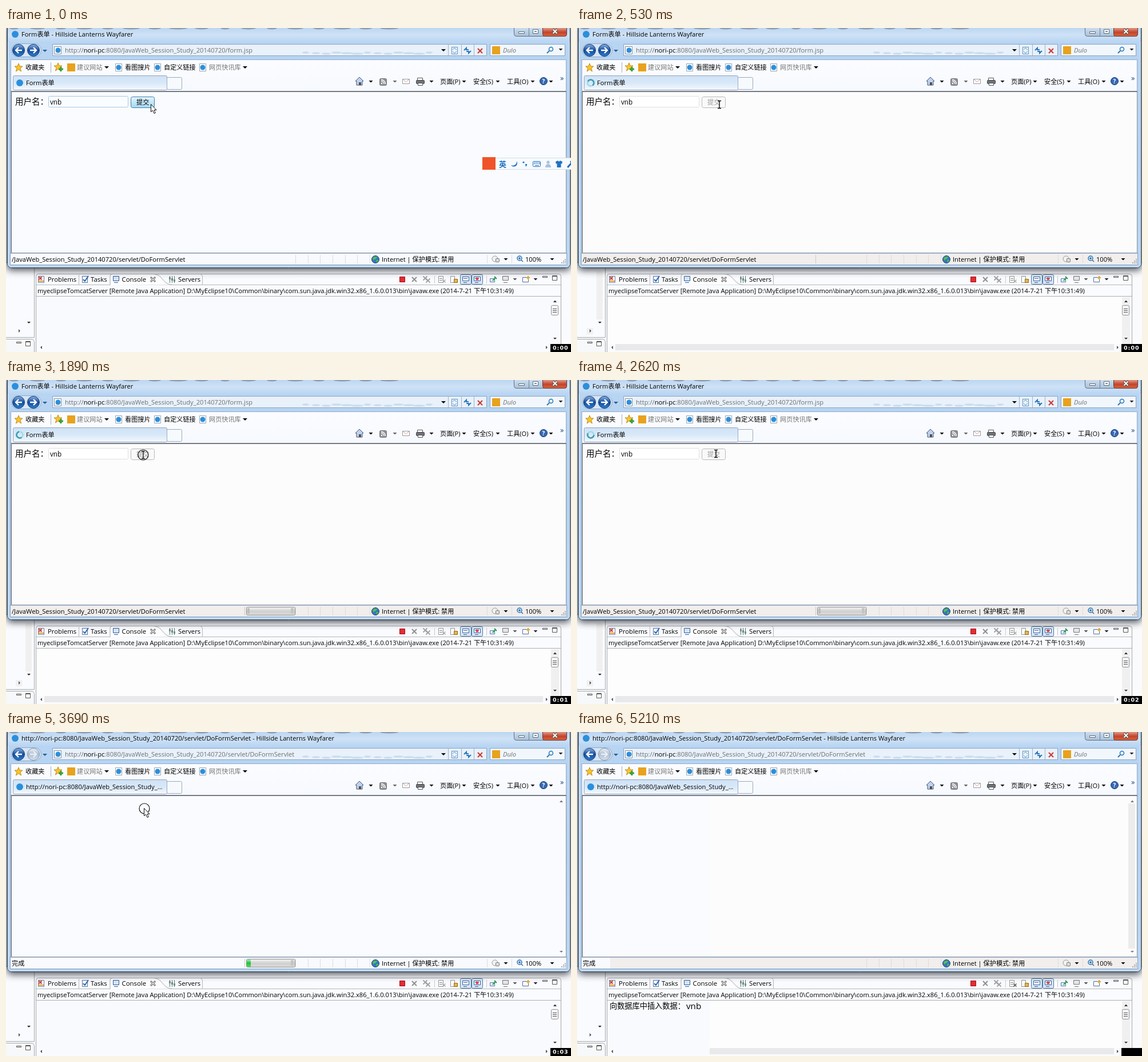
Animation, 988 px wide and 567 px high, one loop 5470 ms. Source, as an HTML page with a canvas:

```html
<!DOCTYPE html>
<html lang="zh-CN">
<head>
<meta charset="utf-8">
<style>
html, body { margin: 0; width: 100%; height: 100%; overflow: hidden; background: #fff; }
canvas { display: block; }
</style>
</head>
<body>
<canvas width="988" height="567"></canvas>
<script>
const g = document.querySelector('canvas').getContext('2d');
const LOOP = 5470, PAGE = 3690;
const FONT = '"Open Sans", "Noto Sans CJK SC", "Noto Sans CJK", sans-serif';
const BROWSER = ' - Hillside Lanterns Wayfarer';
const USER = 'vnb', HOST = 'nori-pc', ROOT = ':8080/JavaWeb_Session_Study_20140720/';
const STEPS = [0, 140, 260, 380, 530, 650, 760, 870, 990, 1140, 1260, 1380, 1530, 1650, 1760, 1880, 1990,
  2110, 2230, 2380, 2500, 2620, 2770, 2890, 3040, 3150, 3260, 3410, 3540, 3690, 3810, 3960, 4070, 4180,
  4330, 4450, 4570, 4690, 4810, 4960, 5110, 5210];
const CLICKS = [140, 760, 1140, 1530, 1880, 2230, 2500, 2890, 3260, 3690];
const PATH = [[0, 253, 133], [260, 253, 133], [530, 249, 134], [1140, 237, 131], [1990, 240, 131],
  [2620, 243, 129], [3540, 241, 132], [3690, 241, 133], [4180, 241, 133], [4810, 938, 558]];

function paint(fill, stroke, width = 1) {
  if (fill) { g.fillStyle = fill; g.fill(); }
  if (stroke) { g.strokeStyle = stroke; g.lineWidth = width; g.stroke(); }
}
function box(x, y, w, h, fill, stroke, r = 0) {
  const o = stroke ? .5 : 0;
  g.beginPath();
  g.roundRect(x + o, y + o, w - 2 * o, h - 2 * o, r);
  paint(fill, stroke);
}
function dot(x, y, r, fill, stroke, width) {
  g.beginPath();
  g.arc(x, y, r, 0, 7);
  paint(fill, stroke, width);
}
function shape(d, x, y, fill, stroke, width) {
  g.save();
  g.translate(x, y);
  const p = new Path2D(d);
  if (fill) { g.fillStyle = fill; g.fill(p); }
  if (stroke) { g.strokeStyle = stroke; g.lineWidth = width || 1; g.stroke(p); }
  g.restore();
}
function grad(y0, y1, ...colors) {
  const f = g.createLinearGradient(0, y0, 0, y1);
  colors.forEach((c, i) => f.addColorStop(i / (colors.length - 1), c));
  return f;
}
// Draws text centred on y and returns its right end.
function text(s, x, y, color = '#000', size = 11.15, style = '') {
  g.font = `${style} ${size}px ${FONT}`;
  g.fillStyle = color;
  g.fillText(s, x, Math.round(y + size * .36));
  return x + g.measureText(s).width;
}
const vline = (x, y0, y1, c) => box(x, y0, 1, y1 - y0, c);
const hline = (x0, x1, y, c) => box(x0, y, x1 - x0, 1, c);
const down = (x, y, c = '#000', s = 4) => shape(`M${-s} -2H${s}L0 ${s - 2}Z`, x, y, c);
const up = (x, y, c = '#333') => shape('M-3 2H3L0 -1.5Z', x, y, c);
const side = (x, y, d) => shape(`M${-d} -3V3L${2 * d} 0Z`, x, y, '#555');
const badge = (x, y, r = 6) => dot(x, y, r, '#2b8fdc');
const star = (x, y) => shape('M0 -7L2 -2 7 -2 3 1.5 4.5 7 0 3.5 -4.5 7 -3 1.5 -7 -2 -2 -2Z', x, y, '#f9c52b', '#c98a12');
const cross = (x, y, c, s = 4, w = 2) => shape(`M${-s} ${-s}L${s} ${s}M${s} ${-s}L${-s} ${s}`, x, y, null, c, w);

// Surface that turns from a cool to a warm white right of `from`.
function surface(x, y, w, h, from, cool, warm) {
  box(x, y, w, h, cool);
  const x0 = Math.max(x, from);
  if (x0 < x + w) box(x0, y, x + w - x0, h, warm);
}

function frameWindow() {
  g.save();
  g.shadowColor = 'rgba(30,35,45,.8)';
  g.shadowBlur = 13;
  g.shadowOffsetY = 4;
  box(2, -10, 985, 430, '#b3d2f3', null, 7);
  g.restore();
  box(2, -10, 985, 430, grad(0, 420, '#b9d5f3', '#b0d0f2', '#b7d5f4'), '#1c2a3a', 7);
  box(3, -10, 983, 429, null, '#e4f0fb', 6);
  box(3, 0, 983, 24, grad(0, 24, '#bcd6f2', '#cfe2f6', '#bad6f3'));
  for (let i = 0; i < 17; i++) {
    g.beginPath();
    g.ellipse(14 + i * 41, 0, 8 + i * 5 % 9, 2.5, 0, 0, 7);
    paint('#8f9dac');
  }
  // window buttons
  box(888, -5, 93, 20, grad(0, 15, '#cbdcec', '#a9c1d9'), '#5d7085', 4);
  box(938, -5, 43, 20, grad(0, 15, '#dc9a8b', '#c5432b', '#d9663f'), '#6b3a36', 4);
  vline(914, 0, 14, '#6f8297');
  box(896, 6, 11, 4, '#fff', '#5b6b7d');
  box(921, 2, 10, 8, '#fff', '#5b6b7d');
  box(924, 5, 4, 2, '#7a90a8');
  cross(960, 6, '#555', 4, 4);
  cross(960, 6, '#fff', 3.5, 2);
}

function navigation(loaded) {
  const tail = loaded ? 'servlet/DoFormServlet' : 'form.jsp';
  const title = loaded ? 'http://' + HOST + ROOT + tail : 'Form表单';
  badge(16, 11);
  text(title + BROWSER, 27, 10.5);

  box(9, 27, 53, 24, '#d7e5f4', '#8ea7c2', 12);
  for (const [x, on] of [[22, true], [48, !loaded]]) {
    dot(x, 39, 10.5, on ? grad(28, 50, '#8db8ea', '#164b9b', '#2b83d6') : grad(28, 50, '#eef3f8', '#aebfd2', '#d9e4ee'), on ? '#173c72' : '#8397ad');
    shape(x < 30 ? 'M6 0H-5M0 -5L-5 0 0 5' : 'M-6 0H5M0 -5L5 0 0 5', x, 39, null, on ? '#fff' : '#e8eff6', 2.4);
  }
  down(68, 40, '#2b5f94');

  box(81, 28, 760, 21, '#e9f1fa', '#8aa3bf');
  for (let i = 0; i < 13; i++) {
    g.beginPath();
    g.ellipse(524 + i * 18, 43 + i % 3, 6 + i * 7 % 6, 1.7, 0, 0, 7);
    paint('#cbdcef');
  }
  box(84, 32, 13, 14, '#fff', '#8792a0');
  badge(91, 39, 4.5);
  let x = text('http://', 103, 39, '#6d6f72');
  x = text(HOST, x, 39);
  text(ROOT + tail, x, 39, '#6d6f72');
  down(765, 39);
  [773, 796, 818].forEach(v => vline(v, 29, 48, '#9fb3c9'));
  box(779, 33, 11, 13, '#eaf5ff', '#5b93c4');
  shape('M2 5L5 2 9 5M2 8L5 11 9 8', 779, 33, null, '#4f92c8');
  shape('M-6 0L-2 -4V-1H2M6 1L2 5V2H-2', 807, 39, null, '#2878bb', 2);
  cross(829, 40, '#d0342c');

  box(846, 28, 132, 21, '#f2f7fc', '#8aa3bf');
  box(850, 32, 14, 14, '#e8a21c');
  text('Dulo', 869, 39, '#6d6f72', 11.15, 'italic');
  dot(953, 37, 3.5, '#e9f5ff', '#2c75b8', 1.5);
  shape('M-2 2L-6 6', 952, 38, null, '#2c75b8', 2);
  down(970, 38, '#222', 3.5);
}

function toolbars(loaded, t, spin) {
  box(8, 55, 972, 57, grad(55, 111, '#fafcff', '#f9fbfe', '#f6f9fe'), '#94aac3');
  star(22, 69);
  text('收藏夹', 34, 69);
  vline(78, 60, 78, '#a5b1bf');
  star(91, 68);
  shape('M0 4H8M4 0V8', 92, 68, null, '#35a03a', 3);
  box(107, 62, 14, 14, '#e8a21c');
  text('建议网站', 124, 69, '#777');
  down(176, 69);
  [[197, '看图搜片', '#000'], [265, '自定义链接', '#000'], [344, '网页快讯库', '#777']].forEach(([x, s, c]) => {
    box(x - 6, 62, 12, 14, '#fff', '#9aa3ad');
    badge(x, 69, 4.5);
    text(s, x + 11, 69, c);
  });
  down(418, 69);

  box(12, 83, 270, 26, grad(84, 108, '#cfe2f5', '#d8e8f8', '#f4f8fd'), '#8ea4bd', 2);
  box(281, 86, 27, 22, '#f7fafd', '#9aabbe', 2);
  if (t >= 530 && !loaded) {
    dot(24, 96, 5.5, null, '#9edbe5', 2.6);
    g.beginPath();
    g.arc(24, 96, 5.5, spin, spin + 3.6);
    paint(null, '#3f9db4', 2.6);
  } else badge(24, 96);
  text(loaded ? 'http://' + HOST + ':8080/JavaWeb_Session_Study_...' : 'Form表单', 35, 96);

  shape('M-7 0L0 -7 7 0H5V7H-5V0Z', 618, 93, '#bfd2ec', '#3e5884');
  box(617, 95, 4, 5, '#5e4c48');
  box(653, 88, 13, 13, '#8d8f92', '#77797c', 2);
  shape('M3 5A5 5 0 0 1 8 10M3 2.5A7.5 7.5 0 0 1 10.5 10', 653, 88, null, '#fff', 1.3);
  dot(657, 97, 1.3, '#fff');
  box(693, 89, 13, 9, '#fff', '#9a9a9a');
  shape('M1 1L6.5 5 12 1', 693, 89, null, '#d49b9b');
  box(719, 87, 10, 5, '#fff', '#555');
  box(717, 91, 15, 7, '#6e7277', '#444', 1);
  box(720, 96, 9, 5, '#fff', '#555');
  [638, 680, 744, 801, 860, 921, 953].forEach(x => down(x, 94, x === 680 ? '#666' : '#000', 3.5));
  text('页面(P)', 759, 94);
  text('安全(S)', 817, 94);
  text('工具(O)', 876, 94);
  dot(940, 93, 6.5, '#3568b3', '#1f3f78');
  text('?', 937.5, 93, '#fff', 10, 'bold');
  text('»', 969, 87, '#1f3f78', 13);
}

function page(loaded, t, warm) {
  box(8, 110, 972, 284, '#fff', '#8a9099');
  surface(10, 112, 969, 281, warm, '#f9fbfe', '#fcfcfc');
  hline(9, 980, 111, '#63676d');
  vline(9, 111, 393, '#7d828a');
  if (loaded) {
    if (warm < 988) box(964, 125, 12, 254, '#ececec');
    up(971, 121, '#777');
    down(971, 385, '#777', 3);
    return;
  }
  text('用户名：', 16, 129, '#000', 14.5);
  const off = t >= 380;
  box(74, 119, 140, 20, off ? '#fff' : '#fafdff', off ? '#dcdfe2' : '#a5c7e3', 2);
  text(USER, 77, 129.5, '#000', 11.7);
  const fill = off ? '#f9f9f9' : t >= 140 ? grad(120, 140, '#c5e3f4', '#7fbedf') : grad(120, 140, '#e6f5fc', '#c3e6f8', '#a3d7f0');
  box(218, 120, 42, 20, fill, off ? '#b5b8bb' : '#3c7fb1', 3);
  text('提交', 228, 130, off ? '#999' : '#000');
}

function status(loaded, t, warm) {
  surface(8, 394, 972, 20, warm === 232 ? 58 : warm, '#f9fafd', '#f1eeed');
  hline(8, 980, 394, '#b3b8bf');
  box(7, 393, 974, 22, null, '#8aa3bf');
  text(loaded ? '完成' : '/JavaWeb_Session_Study_20140720/servlet/DoFormServlet', 10, 404.5);
  [506, 528, 549, 571, 593, 614, 636, 841, 884].forEach(x => vline(x, 397, 412, '#dcdcde'));
  if (t >= 530 && t < 4450) vline(417, 397, 412, '#c9c9cb');
  if (t >= 870 && t < 4450) {
    box(420, 397, 86, 15, grad(398, 412, '#f2f2f2', '#cfcfcf', '#dedede'), '#8e8e8e', 2);
    const done = t < 2770 ? 0 : t < PAGE ? 1 : t < 3810 ? 7 : Math.min(76, 7 + (t - PAGE) / 490 * 69);
    box(422, 399, 4, 10, '#bdbdbd', null, 1);
    if (done) box(421, 398, done, 13, grad(398, 411, '#a6eeb0', '#22c23c', '#4ade5d'));
    box(498, 399, 5, 10, '#c4c4c4', null, 1);
  }
  dot(646, 405, 6.5, '#2f79c0', '#1d4c78');
  shape('M-5 -2Q-1 -7 3 -4Q1 0 -2 0Q-3 4 -5 -2M1 2Q4 -1 5 2L2 5Z', 646, 405, '#62b84b');
  text('Internet | 保护模式: 禁用', 657, 404.5);
  dot(855, 404, 5, '#f2f2f2', '#999');
  box(856, 403, 7, 7, '#ddd', '#777', 1);
  down(874, 405, '#000', 3.5);
  dot(898, 403, 4, '#d8ecfb', '#3272ae', 1.5);
  shape('M-2 0H2M0 -2V2M3 3L6 6', 898, 403, null, '#3272ae', 1.5);
  text('100%', 908, 405);
  down(955, 405, '#000', 3.5);
  for (let i = 0; i < 3; i++) {
    for (let j = 0; j < 3 - i; j++) box(977 - i * 3, 410 - j * 3, 2, 2, '#a9adb3');
  }
}

function workbench(t, warm) {
  box(0, 0, 988, 567, '#fafbfd');
  box(0, 0, 3, 420, '#d2dce7');
  // left panels
  box(-5, 410, 55, 132, '#fafbfe', '#a2a6ab');
  if (warm === 0) {
    box(34, 425, 11, 85, '#f0f0f0');
    box(17, 525, 11, 11, '#f0f0f0');
  }
  down(40, 516, '#222', 3);
  side(23, 530, 1);
  box(-5, 544, 55, 40, '#f7f8fa', '#a2a6ab', 5);
  box(18, 549, 9, 3, '#fff', '#555');
  box(34, 548, 9, 9, '#fff', '#555');
  hline(35, 42, 549, '#555');

  // console panel
  box(52, 430, 919, 150, '#fafbfe', '#a2a6ab', 4);
  hline(53, 970, 449, '#b4b8bd');
  surface(53, 470, 900, 83, warm, '#f9fafd', '#fdfdfd');
  shape('M182 450V435Q182 430.5 187 430.5H258C274 430.5 274 449.5 291 449.5', 0, 0, '#fdfdfe', '#a2a6ab');
  vline(127, 432, 449, '#b4b8bd');
  shape('M338 430.5Q343.5 430.5 343.5 436V449', 0, 0, null, '#b4b8bd');
  box(56, 434, 11, 12, '#fff', '#6d7ea0');
  cross(60, 438, '#d23c35', 2.5);
  shape('M1 9H10', 56, 434, null, '#d8992d', 2);
  text('Problems', 73, 440, '#000', 11.3);
  box(133, 434, 10, 12, '#fff', '#4d71a5');
  shape('M-3 0L0 3 6 -6', 138, 440, null, '#2f66b0', 2);
  text('Tasks', 148, 440, '#000', 11.4);
  box(187, 434, 11, 9, '#d4e4f8', '#31589b');
  hline(189, 196, 445, '#31589b');
  text('Console', 202.5, 440, '#000', 11.4);
  cross(257, 440, '#777', 4, 3);
  cross(257, 440, '#fff', 3, 1);
  for (let i = 0; i < 3; i++) {
    vline(286 + i * 4, 434, 446, '#5f6b73');
    box(285 + i * 4, 436 + i * 2, 3, 4, i === 1 ? '#49a053' : '#7b8c98');
  }
  text('Servers', 301, 440, '#000', 11.3);

  box(688, 435, 10, 10, '#e52a35', '#a5121e');
  cross(714, 440, '#909090');
  cross(733, 438, '#a0a0a0', 3.5, 1.8);
  cross(738, 442, '#a0a0a0', 3.5, 1.8);
  [749, 840].forEach(x => vline(x, 434, 447, '#c6c9cd'));
  box(756, 434, 9, 12, '#fff', '#949494');
  hline(758, 763, 438, '#888');
  hline(758, 763, 441, '#888');
  cross(766, 443, warm === 232 ? '#555' : '#aaa', 2.5, 1.5);
  box(777, 434, 8, 12, '#fff', '#949494');
  box(783, 439, 7, 7, '#e4b743', '#8d6a20');
  [794, 814].forEach((x, i) => {
    box(x, 431, 20, 18, '#d7e7f7', '#54779e', 2);
    box(x + 4, 435, 12, 8, '#fff', '#365f9c');
    hline(x + 6, x + 13, 438, '#365f9c');
    if (i) cross(x + 10, 439, '#d9373a', 2);
    hline(x + 6, x + 12, 445, '#365f9c');
  });
  box(846, 438, 9, 7, '#e8f1fb', '#4b78a9');
  shape('M0 4L5 -1M3 -3L7 1', 851, 438, null, '#299b4c', 2);
  box(868, 434, 11, 8, '#e7e7e7', '#777');
  hline(870, 877, 445, '#777');
  down(890, 440, '#555', 3.5);
  box(903, 436, 11, 9, '#fff', '#496fa6');
  shape('M7 2H13M10 -1V5', 903, 435, null, '#dca62c', 2);
  down(926, 440, '#222', 3.5);
  box(938, 434, 9, 3, '#fff', '#555');
  box(955, 433, 9, 9, '#fff', '#555');
  hline(956, 963, 434, '#555');

  text('myeclipseTomcatServer [Remote Java Application] D:\\MyEclipse10\\Common\\binary\\com.sun.java.jdk.win32.x86_1.6.0.013\\bin\\javaw.exe (2014-7-21 下午10:31:49)', 55, 460);
  hline(53, 970, 469, '#a9adb2');
  if (t >= 3810) {
    text('向数据库中插入数据：', 57, 479.5, '#000', 13.2);
    text(USER, 191, 479.5, '#000', 15.2);
  }
  surface(953, 471, 14, 82, warm, '#f9fafd', '#f0f0f0');
  surface(67, 553, 872, 11, warm, '#f9fafd', '#e9e9ea');
  up(960, 478);
  down(960, 544, '#333', 3);
  box(953, 485, 13, 18, '#f5f5f6', '#8f9297', 2);
  [491, 494, 497].forEach(y => hline(956, 963, y, '#555'));
  side(62, 559, -1);
  side(945, 559, 1);
}

function inputBar() {
  box(845, 227, 160, 21, '#f7fafd', '#d5dee8', 3);
  box(833, 226, 23, 22, '#f0532a');
  const blue = '#1f72c4';
  text('英', 862, 238, blue, 13, 'bold');
  shape('M4 -5A6 6 0 1 1 -6 2A7 7 0 0 0 4 -5', 889, 238, blue);
  dot(905, 235, 1.6, blue);
  shape('M0 0H3V2L1 5', 908, 238, blue);
  box(921, 233, 14, 10, null, blue, 1);
  for (let i = 0; i < 8; i++) box(923 + i % 4 * 3, 235 + (i >> 2) * 2, 2, 1, blue);
  hline(925, 932, 240, blue);
  dot(948, 235, 2.7, '#a9c3dd');
  shape('M-5 6Q-5 0 0 0T5 6Z', 948, 238, '#a9c3dd');
  shape('M-6 -4L-2 -6Q0 -3 2 -6L6 -4 5 0 3.5 -1V6H-3.5V-1L-5 0Z', 967, 238, blue);
  shape('M-4 6L3 -2M1 -5L6 0', 986, 238, null, blue, 3);
}

function pointer(t) {
  if (t >= 4960) return;
  const i = Math.max(1, PATH.findIndex(p => p[0] >= t));
  const [t0, x0, y0] = PATH[i - 1], [t1, x1, y1] = PATH[i];
  const p = (t - t0) / (t1 - t0), s = p * p * (3 - 2 * p);
  const x = x0 + (x1 - x0) * s, y = y0 + (y1 - y0) * s;
  const arrow = t < 380 || t >= PAGE, shift = arrow ? 1 : 0;
  if (CLICKS.includes(t)) dot(x + shift, y + shift, 9, null, '#111', 1.2);
  if (arrow) shape('M.5 .5V14L3.5 11 6 16.5 8.3 15.5 6 10.5H10Z', x, y, '#fff', '#111');
  else shape('M-3 -6.5H-1L0 -5.5 1 -6.5H3M0 -6V6M-3 6.5H-1L0 5.5 1 6.5H3', x, y, null, '#111', 1.4);
}

function clock(t) {
  box(952, 553, 36, 14, '#000');
  if (t >= 5210) return;
  const sec = [990, 1990, 3040, 3960, 5110].filter(v => t >= v).length;
  g.save();
  g.font = 'bold 9.5px "DejaVu Sans", sans-serif';
  g.letterSpacing = '1px';
  g.fillStyle = '#fff';
  g.fillText('0:0' + sec, 956, 563);
  g.restore();
}

function draw(now) {
  const time = now % LOOP;
  const n = STEPS.filter(v => v <= time).length - 1;
  const t = STEPS[n];
  const loaded = t >= PAGE;
  const warm = t < 530 ? 988 : t < PAGE ? 0 : t < 3960 ? 988 : 232;
  workbench(t, warm);
  frameWindow();
  navigation(loaded);
  toolbars(loaded, t, n * .9);
  page(loaded, t, warm);
  status(loaded, t, warm);
  if (t < 260) inputBar();
  pointer(t);
  clock(t);
  requestAnimationFrame(draw);
}
requestAnimationFrame(draw);
</script>
</body>
</html>
```
